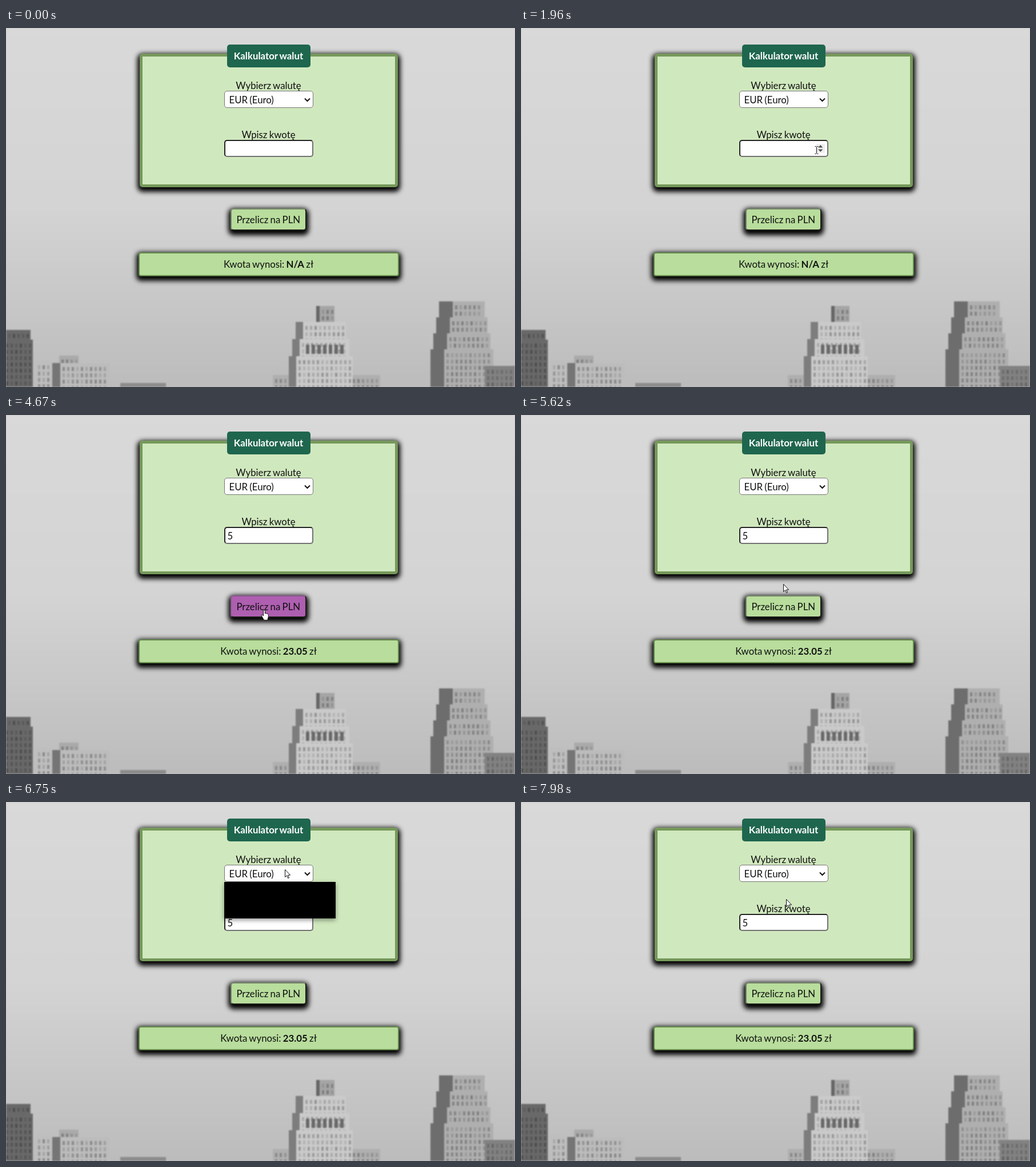
Recreate the animation shown at these times as an HTML page with a canvas. Size 891 by 629 pixels, loop 8 s.

```html
<!DOCTYPE html>
<html lang="pl">
<head>
<meta charset="utf-8">
<title>Kalkulator walut</title>
<style>
  html, body { margin: 0; width: 100%; height: 100%; overflow: hidden; background: #c4c4c4; }
  #stage { position: relative; width: 891px; height: 629px; overflow: hidden;
    font: 16.8px/20px Lato, sans-serif; word-spacing: -1px; color: #111; }
  #stage > * { position: absolute; box-sizing: border-box; white-space: pre; }
  #city { left: 0; top: 0; filter: blur(1px); }
  .raised { box-shadow: 0 4px 9px 4px #000; text-align: center; }
  #panel { left: 234px; top: 45px; width: 452px; height: 234px; border: 5px solid #76995b;
    border-radius: 5px; background: #d0e8be; }
  #legend { left: 386.5px; top: 29px; width: 146px; height: 40px; border-radius: 5px;
    background: #1f664e; color: #fff; font-weight: 700; line-height: 40px; text-align: center; }
  .label { left: 360px; width: 199px; text-align: center; }
  .field { left: 381.5px; width: 156px; background: #fff; border-radius: 5px; }
  #select { top: 110px; height: 30px; border: 1px solid #767676; padding-left: 8px; line-height: 30px; }
  #input { top: 196px; height: 29.5px; border: 2px solid; border-color: #242424 #727272 #727272 #242424;
    padding-left: 4px; line-height: 27px; }
  #input.focus { border-color: #101010; }
  #caret { top: 202px; width: 1px; height: 19px; background: #111; }
  #button { left: 393px; top: 316px; width: 132.5px; height: 39px; border: 2px solid;
    border-color: #78876c #1b1d19 #1b1d19 #78876c; border-radius: 5px;
    background: #b8dd9c; line-height: 35px; }
  #button.hover { background: #ae5fb0; border-color: #8a5a8c #1b1d19 #1b1d19 #8a5a8c; }
  #result { left: 231.5px; top: 392.5px; width: 456px; height: 42px; border: 2px solid #648a4b;
    border-radius: 4px; background: #b8dd9c; line-height: 38px; }
  #list { left: 382px; top: 140px; width: 195px; height: 64px; background: #000;
    box-shadow: 0 3px 8px rgba(0,0,0,.4); overflow: hidden; line-height: 20.6px; }
  #list div { padding-left: 6px; visibility: hidden; }
  #list.ready { background: #fff; border: 1px solid #767676; }
  #list.ready div { visibility: visible; }
  #list.ready div:first-child { background: #1e6fd9; color: #fff; }
  svg { left: 0; top: 0; }
</style>
</head>
<body>
<div id="stage">
  <canvas id="city" width="891" height="629"></canvas>
  <div id="panel" class="raised"></div>
  <div id="legend">Kalkulator walut</div>
  <div class="label" style="top:91px">Wybierz walutę</div>
  <div id="select" class="field">EUR (Euro)</div>
  <div class="label" style="top:177px">Wpisz kwotę</div>
  <div id="input" class="field"></div>
  <div id="caret"></div>
  <div id="button" class="raised">Przelicz na PLN</div>
  <div id="result" class="raised">Kwota wynosi: <b id="sum">N/A</b> zł</div>
  <svg width="891" height="629">
    <path d="M523 123.5l4.5 4.5 4.5-4.5" fill="none" stroke="#111" stroke-width="2"/>
    <g id="spinner">
      <rect x="517" y="203" width="15" height="16" fill="#efefef"/>
      <path d="M520 209.5l4.2-4.5 4.2 4.5zM520 212.5l4.2 4.5 4.2-4.5z" fill="#505050"/>
    </g>
  </svg>
  <div id="list"><div>EUR (Euro)</div><div>USD (Dolar)</div><div>GBP (Funt szterling)</div></div>
  <svg id="pointer" width="891" height="629">
    <g id="cursor" stroke="#111" fill="#fff">
      <path id="arrow" d="M.5.5V13.6L3.5 10.8 5.6 15.6 7.6 14.8 5.5 10.1H9.6Z"/>
      <path id="beam" fill="none" d="M-3-6.5h2l1 1 1-1h2M-3 6.5h2l1-1 1 1h2M0-5.5v11"/>
      <path id="hand" transform="translate(-6 0)" d="M4.5 2C4.5.1 7.3.1 7.3 2V7Q8.5 5.5 9.6 7.2 10.8 6 11.7 7.7 13.3 7 13.3 8.5V12.5L11.9 18.3H5.6L1.3 10.8C.5 9.4 2 8.4 3.1 9.5L4.5 11Z"/>
    </g>
  </svg>
</div>
<script>
const W = 891, H = 629, LOOP = 8000, TICK = 70;
const $ = id => document.getElementById(id);

function drawCity() {
  const c = $('city').getContext('2d');
  const gray = v => `rgb(${v},${v},${v})`;
  let seed = 7;
  const random = () => (seed = seed * 16807 % 2147483647) / 2147483647;

  // a building down to the ground, with a shaded left side and soft windows
  function block(x, y, w, tone, side = 0) {
    c.fillStyle = gray(tone);
    c.fillRect(x, y, w, H - y);
    c.fillStyle = gray(tone * .62);
    c.fillRect(x, y, side, H - y);
    for (let wy = y + 7; wy < H; wy += 11)
      for (let wx = x + side + 4; wx < x + w - 5; wx += 8) {
        c.fillStyle = `rgba(0,0,0,${.1 + random() * .18})`;
        c.fillRect(wx, wy, 4, 7);
      }
  }

  // stepped tower: each tier is lower and wider
  function tower(x, y, w, tone, side, tiers, drop, grow) {
    for (let i = 0; i < tiers; i++)
      block(x - i * grow, y + i * drop, w + 2 * i * grow, tone, side);
  }

  const sky = c.createLinearGradient(0, 0, 0, H);
  sky.addColorStop(0, gray(217));
  sky.addColorStop(.5, gray(212));
  sky.addColorStop(1, gray(188));
  c.fillStyle = sky;
  c.fillRect(0, 0, W, H);

  tower(0, 510, 37, 165, 0, 1);
  tower(0, 529, 43, 105, 0, 2, 17, 4);
  block(52, 584, 26, 190);
  block(93, 574, 34, 170);
  block(81, 587, 101, 188, 14);
  block(200, 622, 80, 140);
  block(467, 608, 188, 175);
  block(543, 487, 32, 165, 6);
  tower(507, 515, 88, 202, 13, 3, 30, 6);
  c.fillStyle = gray(105);
  for (let x = 525; x < 590; x += 10) c.fillRect(x, 555, 6, 16);
  tower(758, 479, 80, 175, 24, 4, 28, 5);
  block(838, 592, 53, 130);
}

const easeOut = p => p ** .74;
const easeInOut = p => p ** 3 * (10 - 15 * p + 6 * p * p);

// start, end, target point of each pointer gesture
const home = [830, 578];
const moves = [
  [200, 1890, 517, 214, easeOut],
  [2150, 2290, 470, 220],
  [3280, 3470, 467, 223],
  [3540, 3850, 447, 331],
  [3990, 4060, 452, 341],
  [5270, 6340, 488, 118],
  [6830, 7440, 452, 158],
  [7770, 7840, 464, 170]
];

function pointerAt(t) {
  let [x, y] = home;
  for (const [from, to, tx, ty, ease = easeInOut] of moves) {
    if (t < from) break;
    const held = Math.floor((t - from) / TICK) * TICK;
    const p = t >= to ? 1 : ease(held / (to - from));
    x += (tx - x) * p;
    y += (ty - y) * p;
  }
  return [Math.round(x), Math.round(y)];
}

const show = (id, on) => { $(id).style.visibility = on ? 'visible' : 'hidden'; };
const within = (x, y, l, t, r, b) => x >= l && x <= r && y >= t && y <= b;

function render(t) {
  const [x, y] = pointerAt(t);
  const onInput = within(x, y, 382, 197, 537, 225);
  const onButton = within(x, y, 394, 317, 525, 354);
  const shape = onInput ? 'beam' : onButton ? 'hand' : 'arrow';
  const focus = t >= 3030 && t < 4480;
  const typed = t >= 3280;

  show('pointer', t >= TICK);
  $('cursor').setAttribute('transform', `translate(${x + (onInput ? .5 : 0)} ${y})`);
  for (const id of ['arrow', 'beam', 'hand']) $(id).style.display = id === shape ? '' : 'none';

  $('input').textContent = typed ? '5' : '';
  $('input').classList.toggle('focus', focus);
  $('caret').style.left = typed ? '397px' : '387px';
  show('caret', focus);
  show('spinner', focus || onInput);
  $('button').classList.toggle('hover', onButton);
  $('sum').textContent = t >= 4550 ? '23.05' : 'N/A';

  $('list').style.display = t >= 6700 && t < 7980 ? '' : 'none';
  $('list').classList.toggle('ready', t >= 6900);
}

drawCity();
const start = performance.now();
function frame() {
  render((performance.now() - start) % LOOP);
  requestAnimationFrame(frame);
}
render(0);
requestAnimationFrame(frame);
</script>
</body>
</html>
```
